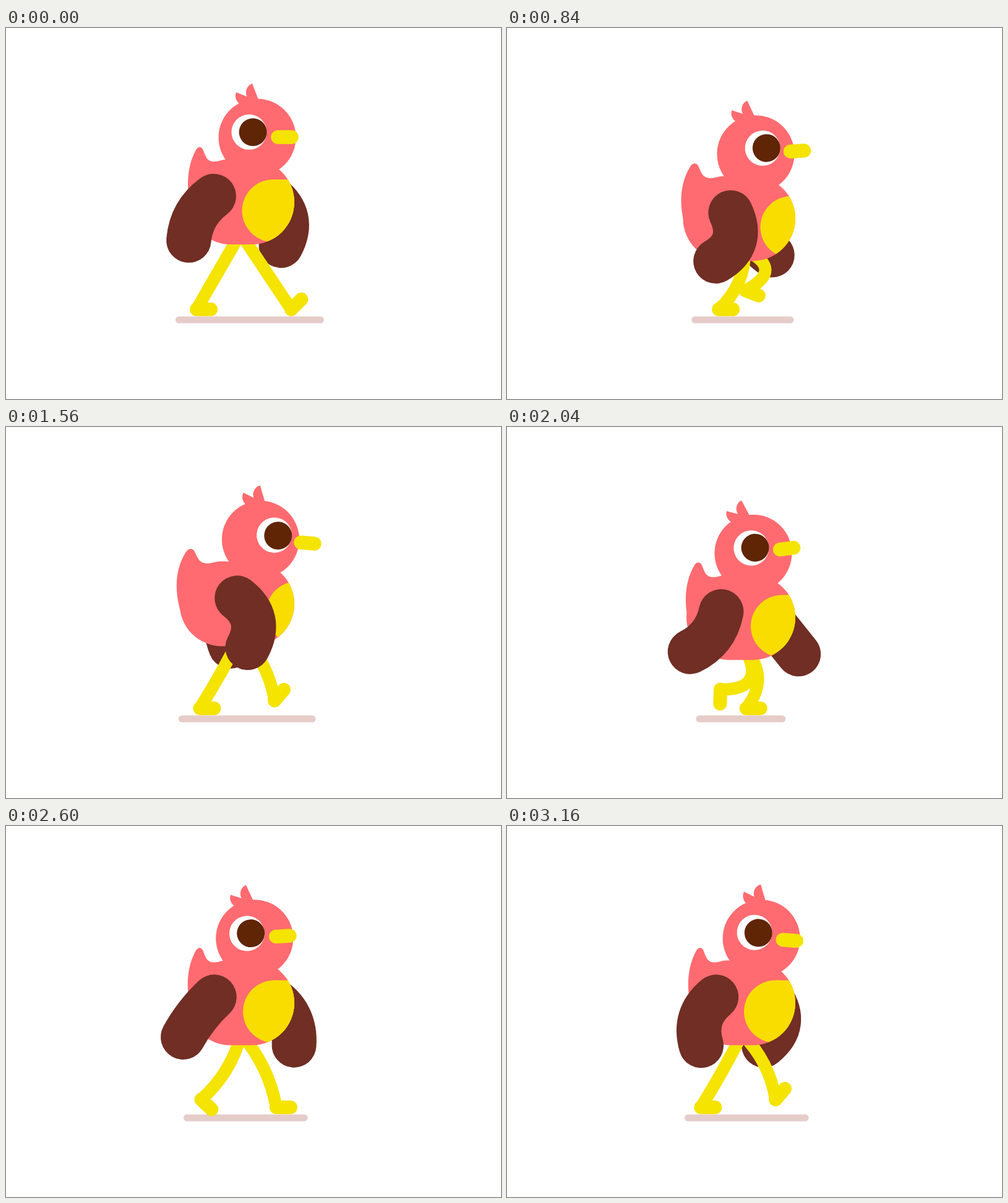
These frames come from a looping animation (800x600 px, 3200 ms). An HTML page with a canvas:

```html
<!DOCTYPE html>
<html>
<head>
<meta charset="utf-8">
<title>Walking bird</title>
<style>
html, body { margin: 0; width: 100%; height: 100%; overflow: hidden; background: #fff; }
canvas { display: block; }
</style>
</head>
<body>
<canvas id="stage" width="800" height="600"></canvas>
<script>
const ctx = document.getElementById('stage').getContext('2d');
const PINK = '#ff6b70', BROWN = '#702e24', YELLOW = '#f5e300', BELLY = '#f9dd00',
      PUPIL = '#5f2505', SHADOW = '#e5ccc8';
const STEP = 640, HALF = STEP / 2, LOOP = 3200, TICK = 40;
const { PI, sin, cos, max, hypot, abs } = Math;
const RAD = PI / 180;

const TAIL = new Path2D('M360 213H354C347 213.5 345 216 337 216C326 216 324 208 321 201' +
  'C318 190 311 190 307 199C299 214 295 233 295 252C295 275 300 300 312 325L370 330Z');
const TUFTS = new Path2D('M2-125L-8-151C-17-148-22-136-14-126L-10-115H2Z' +
  'M-14-129L-34-137C-37-130-34-122-28-118L-14-112Z');

function disc(x, y, r, color) {
  ctx.fillStyle = color;
  ctx.beginPath();
  ctx.arc(x, y, r, 0, 2 * PI);
  ctx.fill();
}

// Round stroke bowed sideways by bend
function limb(x0, y0, x1, y1, width, color, bend = 0) {
  const dx = x1 - x0, dy = y1 - y0, len = hypot(dx, dy);
  ctx.strokeStyle = color;
  ctx.lineWidth = width;
  ctx.lineCap = 'round';
  ctx.beginPath();
  ctx.moveTo(x0, y0);
  ctx.quadraticCurveTo((x0 + x1) / 2 - dy / len * bend, (y0 + y1) / 2 + dx / len * bend, x1, y1);
  ctx.stroke();
}

// Shift by dx, dy, turn by angle, paint, restore
function placed(dx, dy, angle, paint) {
  ctx.save();
  ctx.translate(dx, dy);
  ctx.rotate(angle);
  paint();
  ctx.restore();
}

// Widest when the legs are apart, a little wider on the second contact
function shadow(t) {
  const second = t >= HALF / 2 && t <= HALF * 1.5;
  const near = abs((t + HALF / 2) % HALF - HALF / 2) / (HALF / 2);
  const shrink = second ? near : sin(near * PI / 2), extra = second ? 5 : 0;
  const left = 274 - extra, right = 514 + extra;
  limb(left + (308 - left) * shrink + 5.5, 472, right + (445 - right) * shrink - 5.5, 472, 11, SHADOW);
}

// The foot slides back along the ground for half a stride, then swings forward
function foot(t) {
  t %= STEP;
  const u = t % HALF / HALF, arc = sin(PI * u);
  if (t < HALF) return {
    x: 461 - 153 * (u + u * (1 - u) * (0.21 + 0.7 * u)),
    y: 455,
    angle: -45 * max(0, 1 - t / TICK),
    bend: 40 * sin(PI * u ** 0.7) ** 2
  };
  return {
    x: 308 + 153 * u ** 1.45,
    y: 455 - 33 * arc,
    angle: 80 * arc + 42 * sin(2 * PI * u) - 12 * sin(3 * PI * u) - 45 * u,
    bend: 73 * arc ** 1.4
  };
}

function leg(t, bob) {
  const { x, y, angle, bend } = foot(t);
  limb(379 + bob * 0.2, 332 + bob, x, y, 20, YELLOW, -bend);
  placed(x, y, angle * RAD, () => limb(0, 0, 23, 0, 22, YELLOW));
}

function body(c, s) {
  const turn = (1 - c) / 2;
  ctx.fillStyle = PINK;
  ctx.save();
  ctx.translate(313 - 15.6 * turn + s, 0);
  ctx.scale(1 + 0.2 * turn, 1);
  ctx.translate(-314, 0);
  ctx.fill(TAIL);
  ctx.restore();

  const torso = new Path2D();
  torso.arc(363 - 14.5 * turn, 281.5, 68.5, PI / 2, PI * 1.5);
  torso.arc(397.5, 281.5, 68.5, -PI / 2, PI / 2);
  ctx.fill(torso);

  const bellyX = 432 + 40.5 * turn;
  ctx.save();
  ctx.clip(torso);
  disc(bellyX, 295.5, 50.5, BELLY);
  ctx.fillRect(bellyX, 245, 100, 101);
  ctx.restore();
}

function head(c, s) {
  placed(406, 241, (4.7 - 4.7 * c - 11 * s) * RAD, () => {
    disc(0, -64, 62.5, PINK);
    ctx.fill(TUFTS);
    const eye = 4.9 - 18 * c, beak = 61 - 16.5 * c;
    disc(eye, -72.7, 28.5, '#fff');
    disc(eye + 6.2, -72.5, 22.5, PUPIL);
    limb(beak - 11, -64.5, beak + 11, -64.5, 22.5, YELLOW);
  });
}

function farWing(a, c, s) {
  limb(408.5 + 19 * c, 272, 389 + 55.5 * c + 66 * s, 345.4 + 6.6 * cos(2 * a),
    72, BROWN, -37 * cos(a + 22 * RAD));
}

function nearWing(a, c, s) {
  const x = 355.7 - 20 * c - 2 * s, swing = (-2.5 - 27 * c - 27 * s) * RAD;
  limb(x, 272, x + 82 * sin(swing), 272 + 82 * cos(swing),
    72.5, BROWN, 35 * cos(a + 50 * RAD) - 4);
}

function draw(time) {
  const t = Math.floor(time / TICK) * TICK % LOOP % STEP;
  const a = t / STEP * 2 * PI, c = cos(a), s = sin(a);
  const bob = 15.6 * (1 - cos(2 * a));
  ctx.fillStyle = '#fff';
  ctx.fillRect(0, 0, 800, 600);
  shadow(t);
  placed(0, bob, 0, () => farWing(a, c, s));
  leg(t + HALF, bob);
  leg(t, bob);
  placed(0, bob, 0, () => {
    body(c, s);
    head(c, s);
    nearWing(a, c, s);
  });
}

let start;
function frame(now) {
  start ??= now;
  draw(now - start);
  requestAnimationFrame(frame);
}
draw(0);
requestAnimationFrame(frame);
</script>
</body>
</html>
```
